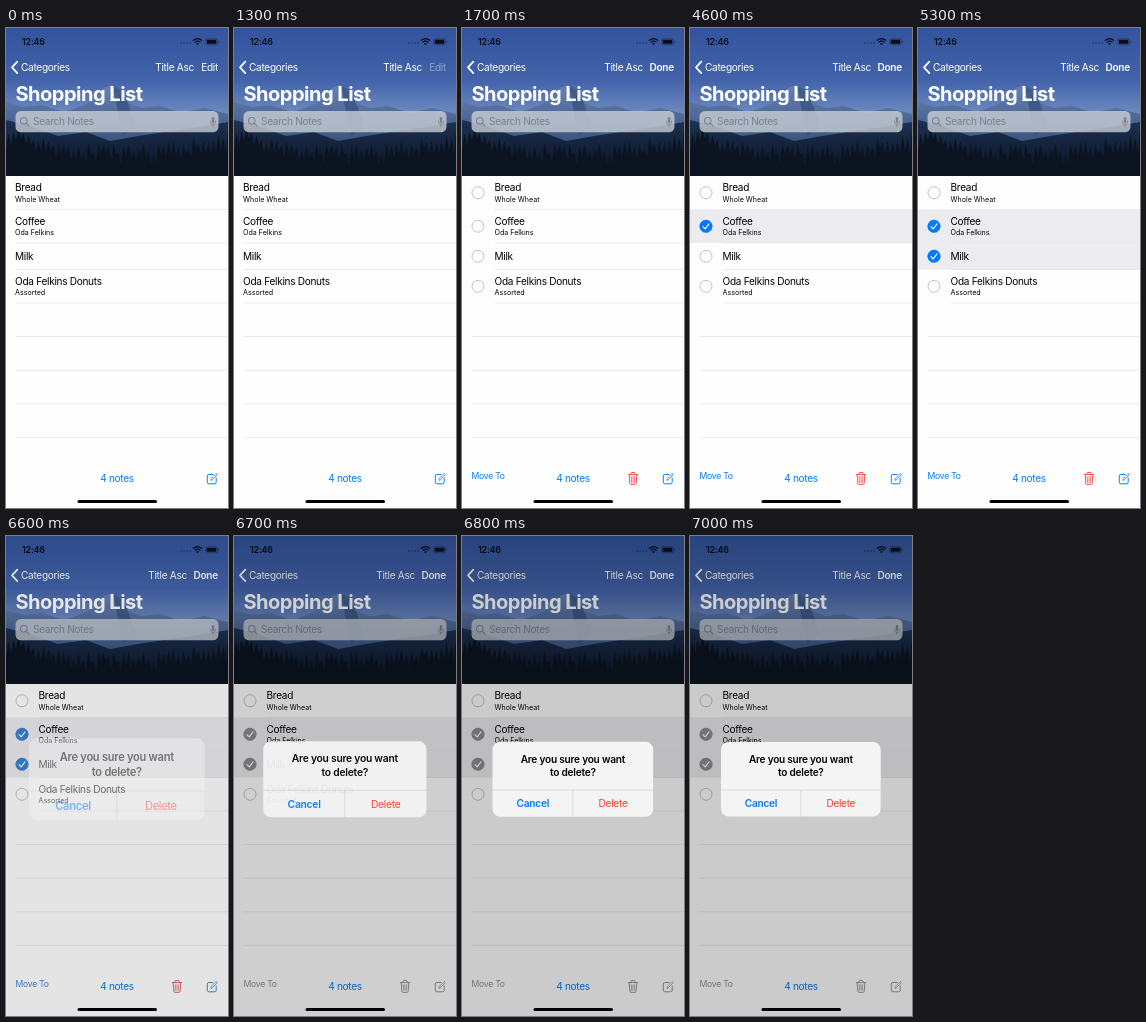
Recreate the animation shown at these times as an HTML page. Size 222 px wide and 480 px high, loop 8000 ms.

```html
<!DOCTYPE html>
<html lang="en">
<head>
<meta charset="utf-8">
<title>Shopping List</title>
<style>
html, body { margin: 0; width: 100%; height: 100%; overflow: hidden; background: #fefefe; }
svg { display: block; width: 222px; height: 480px; --tint: #007aff; --warn: #ff3b30; }
text { font: 10.06px Inter, "Liberation Sans", sans-serif; letter-spacing: -.028em; }
.sub { font-size: 7.1px; letter-spacing: 0; }
.bold { font-weight: 600; letter-spacing: -.022em; }
.big { font-size: 20.1px; font-weight: 700; letter-spacing: -.027em; }
.mid { text-anchor: middle; }
.end { text-anchor: end; }
.line { fill: none; stroke-linecap: round; stroke-linejoin: round; }
.tint { stroke: var(--tint); }
.sep { stroke: #dedee1; stroke-width: .6; }
</style>
</head>
<body>
<svg viewBox="0 0 222 480">
  <defs>
    <linearGradient id="sky" x1="0" y1="0" x2="0" y2="1">
      <stop offset="0" stop-color="#33549c"/>
      <stop offset=".35" stop-color="#4263aa"/>
      <stop offset=".62" stop-color="#7590c2"/>
    </linearGradient>
    <linearGradient id="rock" x1="0" y1="0" x2="0" y2="1">
      <stop offset="0" stop-color="#6682b4"/>
      <stop offset="1" stop-color="#223a62"/>
    </linearGradient>
    <linearGradient id="forest" x1="0" y1="0" x2="0" y2="1">
      <stop offset="0" stop-color="#1c3152"/>
      <stop offset="1" stop-color="#0a121e"/>
    </linearGradient>
    <clipPath id="top"><rect width="222" height="148"/></clipPath>
  </defs>
  <rect width="222" height="480" fill="#fefefe"/>

  <g clip-path="url(#top)">
    <rect width="222" height="148" fill="url(#sky)"/>
    <path d="M0 74 18 79 36 77 58 84 76 78 88 72 98 60 107 57 115 62 122 75 136 80 154 78 176 85 198 80 222 86V148H0Z" fill="url(#rock)"/>
    <path d="M107 57 115 62 122 75 130 98 117 108 112 84Z" fill="#354f7e" opacity=".7"/>
    <path d="M0 92 24 98 52 108 80 104 104 113 132 108 158 104 186 100 222 94V148H0Z" fill="url(#forest)"/>
    <path id="trees" fill="#0b1420"/>
  </g>

  <g fill="#080d18">
    <text class="bold" x="16" y="17.2" style="font-size:8.9px">12:46</text>
    <g opacity=".35">
      <circle cx="175" cy="15" r=".9"/><circle cx="178" cy="15" r=".9"/>
      <circle cx="181" cy="15" r=".9"/><circle cx="184" cy="15" r=".9"/>
    </g>
    <path d="M191.5 17.2 190 15.5Q191.500 14.400 193 15.500Z"/>
    <g class="line" stroke="#080d18" stroke-width="1.2">
      <path d="M188.900 14.100Q191.500 12 194.100 14.100M187.300 12.300Q191.500 9 195.700 12.300"/>
    </g>
    <rect x="199.800" y="10.800" width="11.400" height="6" rx="1.700" fill="none" stroke="#080d18" stroke-width=".6" opacity=".6"/>
    <rect x="200.800" y="11.800" width="9.400" height="4" rx=".9"/>
    <rect x="212" y="12.800" width=".8" height="2" rx=".4" opacity=".6"/>
  </g>

  <g fill="#fff">
    <path class="line" d="M11.300 33.700 6 39.400 11.300 45.100" stroke="#fff" stroke-width="1.700"/>
    <text x="15" y="43">Categories</text>
    <g id="view">
      <text class="end" x="188" y="43">Title Asc</text>
      <text id="edit" class="end" x="212" y="43">Edit</text>
    </g>
    <g id="done">
      <text class="end" x="181" y="43">Title Asc</text>
      <text class="end bold" x="212" y="43">Done</text>
    </g>
    <text class="big" x="9.500" y="73">Shopping List</text>
  </g>
  <rect x="9.500" y="83" width="203" height="21.300" rx="5.500" fill="#c8cdd4" opacity=".8"/>
  <g class="line" stroke="#7b828c" stroke-width="1.100">
    <circle cx="17.800" cy="92.800" r="3.300"/>
    <path d="M20.300 95.300 23 98"/>
    <path d="M204.500 93V94Q204.500 96.500 207 96.500T209.500 94V93M207 96.500V98.500" stroke-width=".8"/>
    <path d="M207 90.300V93.700" stroke-width="2.400"/>
  </g>
  <text x="27" y="97" fill="#7b828c">Search Notes</text>

  <g id="list"></g>

  <text class="mid" x="111" y="454" fill="#0079f2">4 notes</text>
  <g id="tools">
    <text x="9.500" y="451" fill="var(--tint)" style="font-size:8.6px">Move To</text>
    <g id="trash" class="line" stroke="var(--warn)" stroke-width=".9">
      <path d="M166.300 446.600H175.700M169 446.400V445Q169 444.500 169.500 444.500H172.500Q173 444.500 173 445V446.400M167.200 446.800 167.800 455.300Q167.900 456.300 168.900 456.300H173.100Q174.100 456.300 174.200 455.300L174.800 446.800"/>
      <path d="M169.300 448.700 169.500 454.300M171 448.700V454.300M172.700 448.700 172.500 454.300" stroke-width=".7"/>
    </g>
  </g>
  <g class="line tint" stroke-width=".95">
    <path d="M207 446.500H202.900Q201.300 446.500 201.300 448.100V454.200Q201.300 455.800 202.900 455.800H208.600Q210.200 455.800 210.200 454.200V450"/>
    <path d="M205 452 205.400 450.300 210.200 445.500 211.400 446.700 206.600 451.500Z" stroke-width=".75"/>
  </g>
  <rect x="71.500" y="472" width="79.500" height="3" rx="1.500"/>

  <rect id="dim" width="222" height="480"/>
  <g id="alert">
    <rect x="31" y="206" width="159.700" height="74.500" rx="7.700" fill="#f4f4f5"/>
    <path d="M31 254H190.700M110.850 254V280.500" stroke="#c9c9cc" stroke-width=".6"/>
    <text class="mid bold" x="110.850" y="226.700">Are you sure you want</text>
    <text class="mid bold" x="110.850" y="240.300">to delete?</text>
    <text class="mid bold" x="71" y="271" fill="#007aff">Cancel</text>
    <text class="mid" x="150.800" y="271" fill="#ff3b30">Delete</text>
  </g>
</svg>
<script>
const $ = id => document.getElementById(id);
const svg = document.querySelector("svg");
const LOOP = 8000, SHIFT = 23.5;

// title, detail, top, bottom
const notes = [
  ["Bread", "Whole Wheat", 148, 181.5],
  ["Coffee", "Oda Felkins", 181.5, 215],
  ["Milk", "", 215, 241.5],
  ["Oda Felkins Donuts", "Assorted", 241.5, 275]
];

const noteRow = ([title, detail, top, bottom]) => {
  const mid = (top + bottom) / 2;
  return `<g class="row">
    <rect class="fill" y="${top}" width="222" height="${bottom - top}" fill="#ececf0"/>
    <g class="mark">
      <circle cx="16" cy="${mid}" r="6" fill="none" stroke="#bcbcc0" stroke-width=".9"/>
      <g class="check">
        <circle cx="16" cy="${mid}" r="6.5" fill="var(--tint)"/>
        <path class="line" d="M13 ${mid + .3}l2.200 2.300 3.800-5" stroke="#fff" stroke-width="1.100"/>
      </g>
    </g>
    <g class="body">
      <text x="9" y="${detail ? top + 15 : mid + 3.700}">${title}</text>
      <text class="sub" x="9" y="${top + 25.600}">${detail}</text>
      <path class="sep" d="M9.500 ${bottom}H222"/>
    </g>
  </g>`;
};
const emptyRow = i => `<path class="sep" d="M9.500 ${308.6 + i * 33.6}H222"/>`;
$("list").innerHTML = notes.map(noteRow).join("") + [0, 1, 2, 3].map(emptyRow).join("");
const rows = [...document.querySelectorAll(".row")].map(row => {
  const part = name => row.querySelector("." + name);
  return { fill: part("fill"), mark: part("mark"), check: part("check"), body: part("body") };
});

// Fir trees, taller toward both sides
let seed = 11;
const rand = () => (seed = seed * 16807 % 2147483647) / 2147483647;
let firs = "M0 148V124";
for (let x = 0; x < 222; x += 5) {
  const side = Math.abs(x - 116) / 116;
  const tip = 127 - 22 * side * side - 11 * rand();
  firs += `L${x + 2.5} ${tip}L${x + 5} ${tip + 9 + 7 * rand()}`;
}
$("trees").setAttribute("d", firs + "V148Z");

// time, editing, selected notes, alert opacity, alert scale, dim, grey tint
const steps = [
  [0, 0, [], 0, 1.2, 0, 0],
  [1500, .2, [], 0, 1.2, 0, 0],
  [1600, .8, [], 0, 1.2, 0, 0],
  [1700, 1, [], 0, 1.2, 0, 0],
  [4600, 1, [1], 0, 1.2, 0, 0],
  [5300, 1, [1, 2], 0, 1.2, 0, 0],
  [6600, 1, [1, 2], .45, 1.1, .1, .4],
  [6700, 1, [1, 2], .94, 1.022, .185, 1],
  [6800, 1, [1, 2], 1, 1.006, .2, 1],
  [6900, 1, [1, 2], 1, 1.002, .2, 1],
  [7000, 1, [1, 2], 1, 1, .2, 1]
];

const grey = [142, 142, 147];
const fade = (color, k) => `rgb(${color.map((c, i) => Math.round(c + (grey[i] - c) * k))})`;
const show = (el, k) => { el.style.opacity = k; };
const within = (t, from, to) => t >= from && t < to;

function draw(t) {
  const [, editing, picked, alpha, scale, dim, tint] = steps.findLast(s => s[0] <= t);
  show($("view"), 1 - editing);
  show($("done"), editing);
  show($("tools"), editing);
  show($("edit"), within(t, 1300, 1500) ? .4 : 1);
  show($("trash"), within(t, 6400, 6500) ? .4 : 1);
  rows.forEach((row, i) => {
    const on = picked.includes(i) ? 1 : 0;
    show(row.fill, on);
    show(row.check, on);
    show(row.mark, editing);
    row.mark.setAttribute("transform", `translate(${(editing - 1) * SHIFT})`);
    row.body.setAttribute("transform", `translate(${editing * SHIFT})`);
  });
  show($("dim"), dim);
  show($("alert"), alpha);
  $("alert").setAttribute("transform", `translate(110.85 243.2) scale(${scale}) translate(-110.85 -243.2)`);
  svg.style.setProperty("--tint", fade([0, 122, 255], tint));
  svg.style.setProperty("--warn", fade([255, 59, 48], tint));
}

const start = performance.now();
function tick() {
  draw((performance.now() - start) % LOOP);
  requestAnimationFrame(tick);
}
tick();
</script>
</body>
</html>
```
